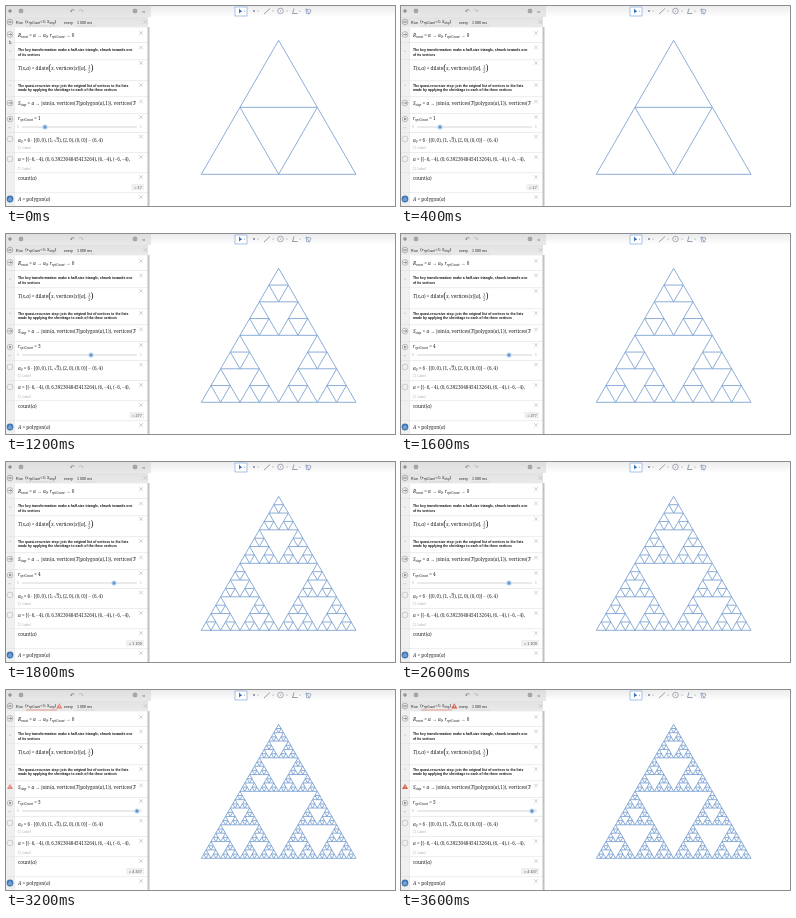
An HTML page with a canvas that plays this animation: 389x200 px, repeating every 3800 ms.

```html
<!DOCTYPE html>
<html lang="en">
<head>
<meta charset="utf-8">
<title>Recursive triangle</title>
<style>
html, body { margin: 0; overflow: hidden; background: #fff; }
canvas { display: block; width: 389px; height: 200px; }
</style>
</head>
<body>
<canvas id="stage" width="389" height="200"></canvas>
<script>
const ctx = document.getElementById('stage').getContext('2d');
const LOOP = 3800;
const SANS = '"Liberation Sans", sans-serif';
const SERIF = '"Noto Serif", serif';
const SYMBOLS = '"DejaVu Sans", sans-serif';
const INK = '#222';
const PANEL = 142;

function box(x, y, w, h, color) {
  ctx.fillStyle = color;
  ctx.fillRect(x, y, w, h);
}

function fade(x, y, w, h, top, bottom) {
  const gradient = ctx.createLinearGradient(0, y, 0, y + h);
  gradient.addColorStop(0, top);
  gradient.addColorStop(1, bottom);
  box(x, y, w, h, gradient);
}

function path(points, color, width = 0.7, fill = false) {
  ctx.beginPath();
  points.forEach(([x, y]) => ctx.lineTo(x, y));
  ctx.strokeStyle = ctx.fillStyle = color;
  ctx.lineWidth = width;
  fill ? ctx.fill() : ctx.stroke();
}

function circle(x, y, r, color, fill = false) {
  ctx.beginPath();
  ctx.arc(x, y, r, 0, Math.PI * 2);
  ctx.strokeStyle = ctx.fillStyle = color;
  ctx.lineWidth = 0.6;
  fill ? ctx.fill() : ctx.stroke();
}

function text(str, x, y, size = 3.65, color = INK, font = SANS, style = '') {
  ctx.font = `${style} ${size}px ${font}`;
  ctx.fillStyle = color;
  ctx.fillText(str, x, y);
  return x + ctx.measureText(str).width;
}

const note = (str, y) => text(str, 12, y, 3.45, '#111', SANS, 'bold');

// Single letters are italic, words upright, _word is a subscript.
function math(str, x, y, size = 4.7) {
  for (const part of str.split(/(_\w+|[a-zA-Z]+)/)) {
    if (part[0] === '_') x = text(part.slice(1), x, y + size * 0.2, size * 0.65, INK, SERIF, 'italic');
    else x = text(part, x, y, size, INK, SERIF, /^[a-zA-Z]$/.test(part) ? 'italic' : '');
  }
  return x;
}

// Lists of points get a thin space after each comma.
const list = (str, x, y) => math(str.replace(/,/g, ',\u2009'), x, y);

function cross(x, y) {
  path([[x - 1.8, y - 1.8], [x + 1.8, y + 1.8]], '#b4b4b4', 0.6);
  path([[x - 1.8, y + 1.8], [x + 1.8, y - 1.8]], '#b4b4b4', 0.6);
}

function warning(x, y, alpha) {
  ctx.globalAlpha = alpha;
  path([[x, y - 2.8], [x + 3, y + 2.4], [x - 3, y + 2.4]], '#dd5a40', 1, true);
  box(x - 0.3, y - 1, 0.6, 1.8, '#fff');
  box(x - 0.3, y + 1.2, 0.6, 0.6, '#fff');
  ctx.globalAlpha = 1;
}

function gear(x, y) {
  circle(x, y, 1.2, '#666');
  for (let i = 0; i < 8; i++) {
    const c = Math.cos(i * Math.PI / 4), s = Math.sin(i * Math.PI / 4);
    path([[x + c * 1.3, y + s * 1.3], [x + c * 2.3, y + s * 2.3]], '#666', 0.8);
  }
}

function sierpinski(x, y, side, depth) {
  const h = side * Math.sqrt(3) / 2;
  if (!depth) {
    ctx.moveTo(x, y);
    ctx.lineTo(x + side / 2, y - h);
    ctx.lineTo(x + side, y);
    ctx.closePath();
    return;
  }
  sierpinski(x, y, side / 2, depth - 1);
  sierpinski(x + side / 2, y, side / 2, depth - 1);
  sierpinski(x + side / 4, y - h / 2, side / 2, depth - 1);
}

function drawToolbars() {
  fade(0, 0, 389, 11, '#ececee', '#ffffff');
  fade(0, 0, PANEL + 3, 11, '#dededf', '#e8e8e9');
  path([[2, 5], [6, 5]], '#666', 0.8);
  path([[4, 3], [4, 7]], '#666', 0.8);
  gear(15, 5);
  text('↶', 64, 7, 5.5, '#666', SYMBOLS);
  text('↷', 73, 7, 5.5, '#aaa', SYMBOLS);
  gear(129, 5);
  text('«', 136, 7, 6, '#777');

  const slate = '#70798c';
  box(229, 1, 12, 9, '#fff');
  ctx.strokeStyle = '#80a8dc';
  ctx.lineWidth = 0.7;
  ctx.strokeRect(229, 1, 12, 9);
  path([[233, 2.5], [233, 7.5], [234.3, 6.3], [236.3, 5.8]], '#3b74c0', 1, true);
  for (const x of [238.5, 252, 267, 281, 294])
    path([[x - 0.8, 4.7], [x + 0.8, 4.7], [x, 5.9]], '#999', 1, true);
  circle(248, 5, 0.9, slate, true);
  path([[258, 8], [264, 2.5]], slate);
  circle(274.5, 5, 2.8, slate);
  circle(274.5, 5, 0.5, slate, true);
  path([[288, 2.5], [286.5, 7.5], [291.5, 7.5]], slate);
  path([[300, 3], [305, 4], [303.5, 8], [300.5, 7.5], [300, 3], [303.5, 8]], '#7f93b8');
}

function drawTicker(failed, alert) {
  fade(0, 11, PANEL, 10.4, '#e2e2e3', '#eaeaeb');
  circle(4, 16, 2.8, '#888');
  path([[2.4, 16], [5.6, 16]], '#666', 0.9);
  text('Run', 10, 17.5);
  math('{r_rptCount<5: S_step}', 19, 17.3, 4.2);
  path([[20, 20], [51, 20]], failed ? '#e0796a' : '#cfcfd0', 0.7);
  text('every', 58, 17.5);
  text('1 000 ms', 71, 17.5);
  path([[70, 20], [89, 20]], '#cfcfd0', 0.6);
  cross(139.5, 16);
  if (alert) warning(53.3, 16, alert);
}

function drawStrip(time, alert) {
  box(0, 21.4, 8.5, 179, '#f0f0f1');
  box(8.2, 21.4, 0.5, 179, '#dedede');
  for (const y of [28.5, 97]) {
    if (y === 97 && alert) continue;
    circle(4, y, 2.9, '#999');
    path([[2.2, y], [5.6, y]], '#777');
    path([[4.4, y - 1.2], [5.8, y], [4.4, y + 1.2]], '#777');
  }
  if (alert) warning(4, 96.5, alert);
  for (const y of [48, 82]) text('“', 2.8, y, 6, '#c0c0c0', SERIF);
  circle(4, 113, 2.8, '#999');
  path([[3.2, 111.6], [5.6, 113], [3.2, 114.4]], '#777', 1, true);
  text('↔', 2, 122.5, 4, '#bbb', SYMBOLS);
  circle(4, 133, 2.9, '#b0b0b0');
  circle(4, 153, 2.9, '#b0b0b0');
  circle(4, 193, 3.4, '#3d78b8', true);
  path([[2.4, 194.2], [4, 191.5], [5.6, 194.2], [2.4, 194.2]], '#dce8f5', 0.5);
  if (time < 400) {
    const y = time < 200 ? 34 : 33;
    path([[3.3, y], [3.3, y + 4.5], [4.3, y + 3.6], [6, y + 3.5]], '#666', 1, true);
  }
}

function drawExpressions(value, depth) {
  for (const y of [36, 53.5, 74.5, 90.5, 107, 126, 146, 166.5, 186.5])
    box(0, y, PANEL, 0.6, '#e2e2e2');
  for (const y of [27, 41.5, 57, 79, 95.5, 111, 130.5, 151, 171, 191]) cross(135, y);

  math('R_reset = a → a_0, r_rptCount → 0', 12, 30.7);
  note('The key transformation: make a half-size triangle, shrunk towards one', 45);
  note('of its vertices', 49.6);

  let x = math('T(x,a) = dilate', 12, 64.3);
  x = text('(', x, 65.3, 8, INK, SERIF);
  x = math('x, vertices(x)[a], ', x, 64.3);
  text('1', x + 0.4, 62, 3.4, INK, SERIF);
  text('2', x + 0.4, 66.8, 3.4, INK, SERIF);
  path([[x, 62.9], [x + 2.7, 62.9]], INK, 0.4);
  text(')', x + 2.9, 65.3, 8, INK, SERIF);

  note('The quasi-recursive step: join the original list of vertices to the lists', 80.6);
  note('made by applying the shrinkage to each of the three vertices', 85.4);

  ctx.save();
  ctx.beginPath();
  ctx.rect(9, 90, 121, 77);
  ctx.clip();
  math('S_step = a → join(a, vertices(T(polygon(a),1)), vertices(T(', 12, 98.8);
  list('a = [(−6,−4),(0,6.392304845413264),(6,−4),(−6,−4),', 12, 155);
  ctx.restore();

  math('r_rptCount = ' + value, 12, 113.7);
  const thumb = 16 + 23 * value;
  text('0', 11, 122.3, 3, '#aaa');
  text('5', 134, 122.3, 3, '#aaa');
  path([[16, 121], [131, 121]], '#d2d2d2', 0.9);
  circle(thumb, 121, 2.6, '#bcd4ee', true);
  circle(thumb, 121, 1.5, '#5a94d0', true);

  x = list('a_0 = 6 · [(0,0),(1,', 12, 135.7);
  x = math('√3', x, 135.7);
  path([[x - 2.8, 131.6], [x, 131.6]], INK, 0.4);
  list('),(2,0),(0,0)] − (6,4)', x, 135.7);
  for (const y of [143, 163.7]) {
    ctx.strokeStyle = '#c4c4c4';
    ctx.lineWidth = 0.4;
    ctx.strokeRect(12, y - 2.6, 2.6, 2.6);
    text('Label', 16.5, y, 3.3, '#aaa');
  }

  math('count(a)', 12, 173.7);
  let count = 4;
  for (let i = 0; i < depth; i++) count = 4 * count + 1;
  const label = '= ' + String(count).replace(/(\d)(\d{3})$/, '$1 $2');
  ctx.font = `3.8px ${SANS}`;
  const width = ctx.measureText(label).width;
  box(133 - width, 178, width + 5, 6.4, '#efefef');
  text(label, 135.8 - width, 182.7, 3.8, '#555');
  math('A = polygon(a)', 12, 194.5);
}

function draw(now) {
  const time = now % LOOP;
  const stepsPassed = times => 1 + times.filter(t => time >= t).length;
  const depth = stepsPassed([600, 1200, 1800, 2800]);
  const value = stepsPassed([600, 1200, 1600, 2800]);
  const alert = time < 3200 ? 0 : time < 3400 ? 0.7 : 1;

  box(0, 0, 389, 200, '#fff');
  drawToolbars();
  drawTicker(time >= 2800, alert);
  drawStrip(time, alert);
  drawExpressions(value, depth);
  box(PANEL - 0.5, 21, 2, 179, '#c2c2c4');

  ctx.beginPath();
  sierpinski(195.3, 168.3, 154.7, depth);
  ctx.strokeStyle = '#789fd0';
  ctx.lineWidth = 0.85;
  ctx.lineJoin = 'round';
  ctx.stroke();
  requestAnimationFrame(draw);
}
requestAnimationFrame(draw);
</script>
</body>
</html>
```
